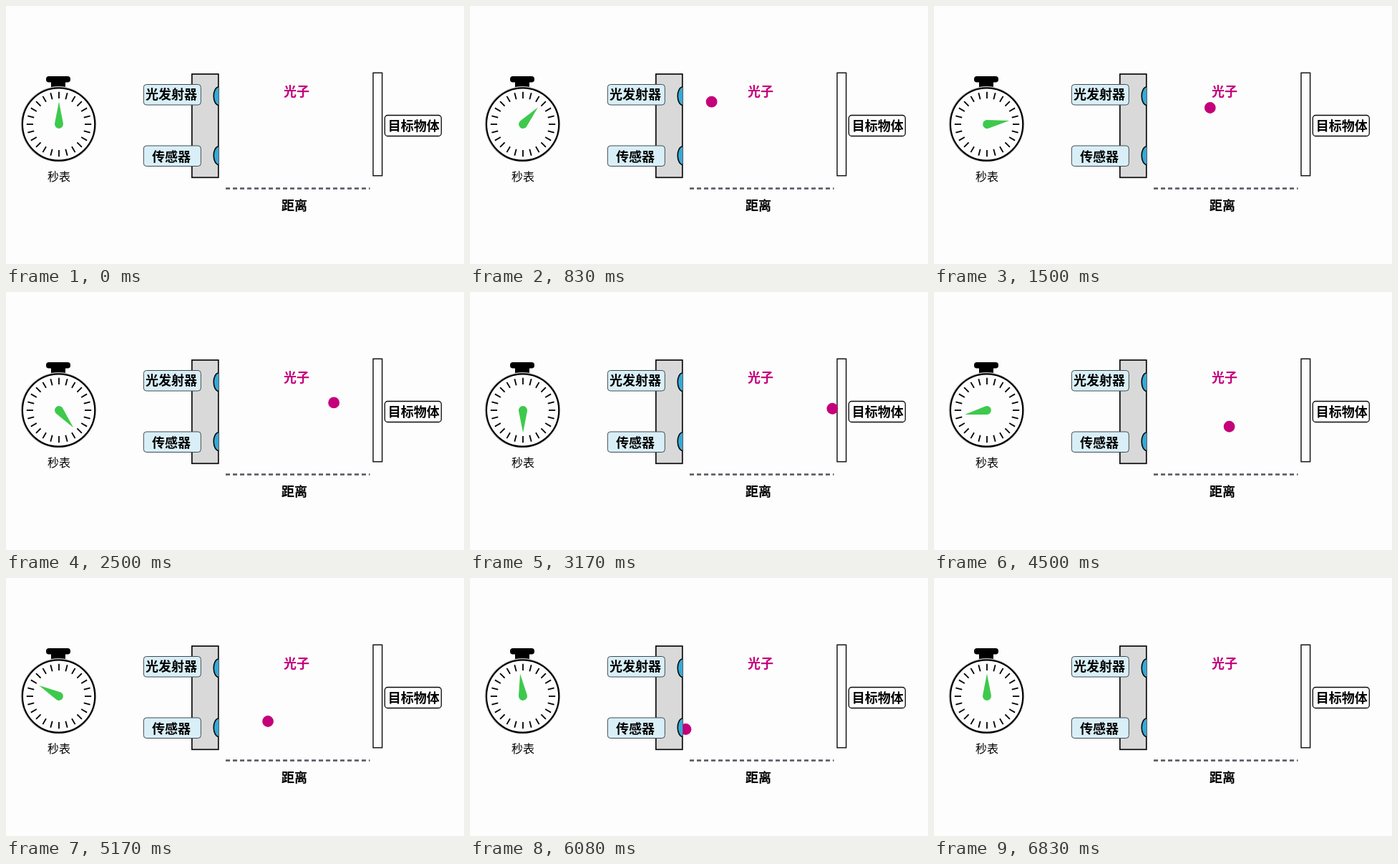
Recreate the animation shown at these times as an HTML page. Size 640x360 px, loop 6.91 s.

```html
<!DOCTYPE html>
<html lang="zh-CN">
<head>
<meta charset="utf-8">
<title>飞行时间测距</title>
<style>
  html, body { margin: 0; width: 100%; height: 100%; overflow: hidden; background: #fdfdfd; }
  svg { display: block; width: 100vw; height: 100vh; }
  text { font: bold 18px "Noto Sans CJK SC", "Noto Sans CJK", sans-serif; text-anchor: middle; }
  .label { fill: #d9eff7; stroke: #404a50; stroke-width: 1; }
  .lens { fill: #36a9d6; stroke: #0a0a0a; stroke-width: 1.6; }
</style>
</head>
<body>
<svg viewBox="0 0 640 360">
  <defs>
    <clipPath id="beam"><rect x="297.5" y="0" width="342.5" height="360"/></clipPath>
  </defs>

  <!-- stopwatch -->
  <rect x="63" y="104" width="20" height="10"/>
  <rect x="56" y="98" width="34" height="8.5" rx="4"/>
  <g transform="translate(74 165)">
    <circle cx="-.6" r="52.9" fill="#cfcfcf"/>
    <circle cx="-.4" r="50.7" fill="#fdfdfd" stroke="#000" stroke-width="2.2"/>
    <g id="ticks" stroke="#000" stroke-width="1.8"></g>
    <path id="hand" fill="#3ec94c" d="M0-31.5 L5.9-1.2 A6 6 0 1 1-5.9-1.2Z"/>
  </g>
  <text x="74" y="243.8" style="font-weight:400;font-size:16px">秒表</text>

  <!-- sensor module -->
  <rect x="259.8" y="95" width="37" height="144.3" fill="#d9d9d9" stroke="#0a0a0a" stroke-width="1.7"/>
  <path class="lens" d="M297 113 A6.8 12.7 0 0 0 297 138.4"/>
  <path class="lens" d="M297 196 A6.8 12.7 0 0 0 297 221.4"/>
  <rect class="label" x="192.3" y="109.5" width="80" height="28.5" rx="4"/>
  <rect class="label" x="192.3" y="195" width="80" height="28.5" rx="4"/>
  <text x="231" y="130.3">光发射器</text>
  <text x="231" y="216.8">传感器</text>

  <!-- target and distance -->
  <rect x="513" y="93.3" width="12.6" height="143.5" fill="#fdfdfd" stroke="#0a0a0a" stroke-width="1.4"/>
  <rect x="529.3" y="152.5" width="79" height="29" rx="4" fill="#fdfdfd" stroke="#0a0a0a" stroke-width="1.3"/>
  <text x="569.7" y="173.5">目标物体</text>
  <path d="M307 254.6H508.5" stroke="#62606a" stroke-width="2.8" stroke-dasharray="6 4"/>
  <text x="403" y="285.3">距离</text>

  <text x="406" y="125.7" fill="#c4007a">光子</text>
  <g clip-path="url(#beam)"><circle id="photon" r="7.9" fill="#c4007a"/></g>
</svg>
<script>
const LOOP = 6910, STEP = 1000 / 12;
const START = 134, END = 6205;
// Photon waypoints: time, x, y
const path = [
  [START, 287, 125], [3170, 506.6, 162.8], [3750, 465, 174],
  [5167, 366, 200], [6083, 301.5, 211], [6260, 288, 213.5]
];
const hand = document.getElementById("hand");
const photon = document.getElementById("photon");

document.getElementById("ticks").innerHTML = Array.from({ length: 24 }, (_, i) =>
  `<path d="M0-45.2V-36" transform="rotate(${i * 15})"/>`).join("");

const clamp01 = v => Math.min(1, Math.max(0, v));

function positionAt(t) {
  let i = 0;
  while (i < path.length - 2 && t > path[i + 1][0]) i++;
  const [t0, x0, y0] = path[i], [t1, x1, y1] = path[i + 1];
  const k = clamp01((t - t0) / (t1 - t0));
  return [x0 + (x1 - x0) * k, y0 + (y1 - y0) * k];
}

function draw() {
  // The picture advances at 12 steps per second.
  const t = Math.floor((performance.now() % LOOP + 4) / STEP) * STEP;
  const [x, y] = positionAt(t);
  photon.setAttribute("cx", x);
  photon.setAttribute("cy", y);
  hand.setAttribute("transform", `rotate(${360 * clamp01((t - START) / (END - START))})`);
  requestAnimationFrame(draw);
}
draw();
</script>
</body>
</html>
```
